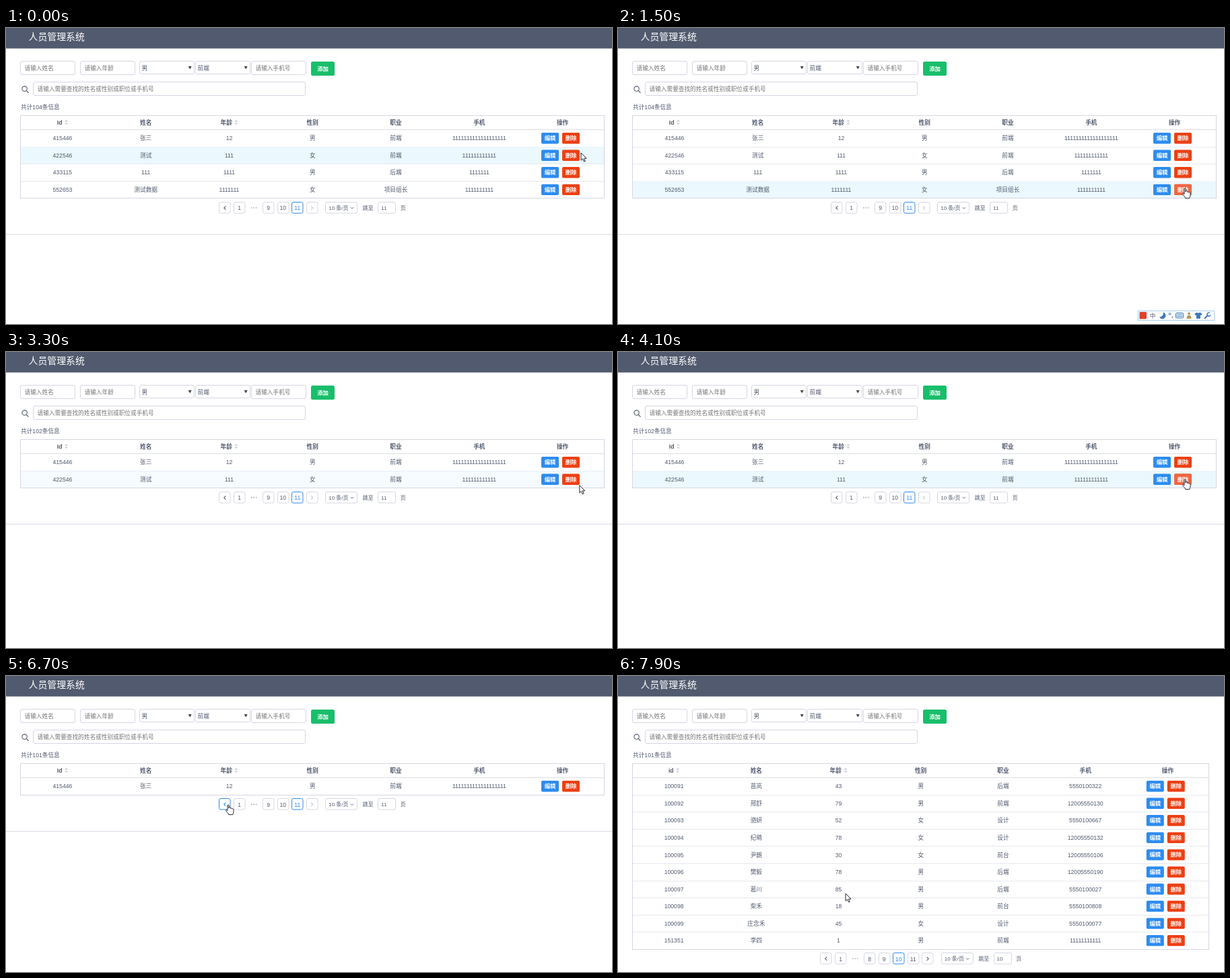
Recreate the animation shown at these times as an HTML page. Size 900 by 441 pixels, loop 8 s.

```html
<!DOCTYPE html>
<html lang="zh-CN">
<head>
<meta charset="utf-8">
<title>人员管理系统</title>
<style>
html, body { margin: 0; width: 100%; height: 100%; overflow: hidden; background: #fff; }
svg { display: block; width: 900px; height: 441px; }
text { font: 8.67px "Liberation Sans", "Noto Sans CJK SC", "Noto Sans CJK", sans-serif; fill: #515a6e; }
.hint { fill: #757575; }
.bold { font-weight: bold; }
.small { font-size: 8px; }
.white { fill: #fff; }
.title { font-size: 13.9px; fill: #fff; }
.btn { font-size: 8.4px; font-weight: bold; fill: #fff; }
.off { fill: #c5c8ce; }
.on { fill: #2d8cf0; }
</style>
</head>
<body>
<svg viewBox="0 0 900 441">
  <g id="fixed"></g>
  <g id="view"></g>
  <g id="ime"></g>
  <path id="cursor" stroke="#26262e" fill="#fff" stroke-linejoin="round"/>
</svg>
<script>
const LOOP = 8000, STEP = 100;
const TOP = 151.7, PITCH = 25.55, LEFT = 22;
const BORDER = '#d6d6e4', BLUE = '#2d8cf0', RED = '#ed4014';
const DELETES = [1800, 2900, 5000], TURN = 6900;
const HEADS = ['Id', '姓名', '年龄', '性别', '职业', '手机', '操作'];

const lastPage = [
  ['415446', '张三', '12', '男', '前端', '1'.repeat(19)],
  ['422546', '测试', '111', '女', '前端', '1'.repeat(12)],
  ['433115', '111', '1111', '男', '后端', '1'.repeat(7)],
  ['552653', '测试数据', '1111111', '女', '项目组长', '1'.repeat(10)]
];
const prevPage = [
  ['100091', '苗岚', '43', '男', '后端', '5550100322'],
  ['100092', '邢舒', '79', '男', '前端', '12005550130'],
  ['100093', '骆妍', '52', '女', '设计', '5550100667'],
  ['100094', '纪萌', '78', '女', '设计', '12005550132'],
  ['100095', '尹朗', '30', '女', '前台', '12005550106'],
  ['100096', '樊毅', '78', '男', '后端', '12005550190'],
  ['100097', '葛川', '85', '男', '后端', '5550100027'],
  ['100098', '柴禾', '18', '男', '前台', '5550100808'],
  ['100099', '庄念禾', '45', '女', '设计', '5550100077'],
  ['151351', '李四', '1', '男', '前端', '1'.repeat(11)]
];

// Pointer stops: time, x, y
const path = [
  [0, 854, 186], [500, 877, 230], [600, 879, 234], [900, 884, 237],
  [1000, 881, 237], [1300, 847, 239], [1500, 841, 239], [1900, 841, 239],
  [2500, 842, 214], [2950, 842, 214], [3500, 856, 192], [3800, 843, 190],
  [4100, 841, 190], [5000, 841, 190], [5800, 327, 198], [6400, 329, 192],
  [6900, 329, 192], [7700, 338, 324], [8000, 338, 324]
];
const ARROW = 'M0 0V11.2L2.6 8.8L4.5 13L6.3 12.2L4.5 8.2H8Z';
const HAND = 'M0 .8C0-.5 2-.5 2 .8V5C3-.0 4.6 4.4 4.6 5.4C5.4 4.6 6.8 5 6.8 6C7.6 5.4 9 5.8 9 7V10C9 12 8 12.6 7.8 14.6H1.6C1.4 12.4-1 11-2.4 8.6C-2.8 7.4-1.4 6.8-.8 7.8L0 8.6Z';

const $ = id => document.getElementById(id);
const text = (x, y, s, cls = '', anchor = 'middle') =>
  `<text x="${x}" y="${y}" dy=".37em" class="${cls}" text-anchor="${anchor}">${s}</text>`;
const rect = (x, y, w, h, fill, stroke = 'none', r = 2.5) =>
  `<rect x="${x}" y="${y}" width="${w}" height="${h}" rx="${r}" fill="${fill}" stroke="${stroke}"/>`;
const box = (x, y, w, h, stroke = BORDER) => rect(x, y, w, h, '#fff', stroke);
const shape = (d, fill, stroke = 'none', w = 1) =>
  `<path d="${d}" fill="${fill}" stroke="${stroke}" stroke-width="${w}"/>`;
const snap = v => Math.round(v) + .5;
const rule = (x1, x2, y, color) => shape(`M${x1} ${snap(y - .5)}H${x2}`, 'none', color);

function drawFixed() {
  let s = rect(0, 0, 900, 30.5, '#515a6e', 'none', 0) + text(33.5, 13, '人员管理系统', 'title', 'start');
  [[21.5, '请输入姓名'], [110.5, '请输入年龄'], [364.5, '请输入手机号']].forEach(([x, label]) => {
    s += box(x, 49.5, 81, 20) + text(x + 6, 59.7, label, 'hint', 'start');
  });
  [[198.5, '男'], [281.5, '前端']].forEach(([x, label]) => {
    s += box(x, 49.5, 81, 19) + text(x + 3, 59.7, label, '', 'start') +
      shape(`M${x + 72.2} 57h5l-2.5 4.4z`, '#444');
  });
  s += rect(453, 50, 35, 21, '#19be6b') + text(470.5, 61, '添加', 'btn');
  s += '<circle cx="27.6" cy="90.6" r="3.7" fill="none" stroke="#515a6e" stroke-width="1.1"/>' +
    shape('M30.3 93.4l3.2 3.2', 'none', '#515a6e', 1.3);
  return s + box(40.5, 80.5, 404, 20) +
    text(46.5, 90.5, '请输入需要查找的姓名或性别或职位或手机号', 'hint', 'start');
}

function drawIme() {
  const ink = '#3f78b8';
  let s = rect(772.5, 421.5, 113, 14, '#fff', '#a4cdf0', 0);
  s += rect(774.5, 423, 10.5, 10.5, '#e0402c', 'none', 1) + text(794, 428.5, '中', '', 'middle');
  s += shape('M809.5 423.5a5 5 0 1 1-5.5 7.2a5.5 5.5 0 0 0 5.5-7.2', ink);
  s += `<circle cx="819.5" cy="426" r="1.4" fill="none" stroke="${ink}"/>` + shape('M822.5 430h2l-1.5 3z', ink);
  s += rect(828.5, 424.5, 11, 7.5, '#dcebf8', ink, 1) +
    shape('M830 427h8M830 429.5h8', 'none', ink, .8);
  s += '<circle cx="848" cy="425.5" r="2" fill="#b79a50"/>' + shape('M844.5 433q0-5 3.5-5t3.5 5z', '#b79a50');
  s += shape('M858.5 424h2q1.3 1.5 2.6 0h2l2.4 2.5l-1.6 1.7l-1-.7v5.5h-6v-5.5l-1 .7l-1.6-1.7z', ink);
  return s + shape('M871 433l5-5', 'none', ink, 2) + shape('M879 424.5a2.6 2.6 0 1 0 1 3', 'none', ink, 1.5);
}

function pointer(t) {
  const i = Math.max(1, path.findIndex(p => p[0] >= t));
  const [t0, x0, y0] = path[i - 1], [t1, x1, y1] = path[i];
  const k = (t - t0) / (t1 - t0), e = k * k * (3 - 2 * k);
  return { x: x0 + (x1 - x0) * e, y: y0 + (y1 - y0) * e };
}

function stateAt(t) {
  const { x, y } = pointer(t), turned = t >= TURN;
  const total = 104 - DELETES.filter(d => t >= d).length;
  const rows = turned ? prevPage : lastPage.slice(0, total - 100);
  const bottom = TOP + rows.length * PITCH;
  const i = Math.floor((y - TOP) / PITCH);
  const row = !turned && i >= 0 && i < rows.length && x > LEFT && x < 889 ? i : -1;
  const mid = TOP + (row + .5) * PITCH;
  const del = row >= 0 && x >= 826 && x <= 852 && Math.abs(y - mid) < 8.5;
  const prev = !turned && x > 316 && x < 334 && Math.abs(y - bottom - 14.2) < 9;
  return { x, y, turned, total, rows, bottom, row, del, prev };
}

function drawTable(now, before) {
  const width = now.turned ? 855.5 : 866.5, right = LEFT + width, col = width / 7;
  const cx = i => LEFT + col * (i + .5);
  // Half strength on the first step of a hover, full on the next
  const fade = test => (test(now) + test(before)) / 2;
  let s = text(22, 118, `共计${now.total}条信息`, '', 'start');

  now.rows.forEach((cells, i) => {
    const y = TOP + i * PITCH, mid = y + PITCH / 2 - .3;
    const tint = fade(v => v.row === i);
    if (tint) s += `<g opacity="${tint}">${rect(LEFT, y, width, PITCH, '#ebf8fd', 'none', 0)}</g>`;
    cells.forEach((c, j) => { s += text(cx(j), mid, c); });
    const bx = cx(6) - 31.6, lit = fade(v => v.row === i && v.del);
    s += rect(bx, mid - 8.2, 26, 16.4, BLUE, 'none', 2) + text(bx + 13, mid, '编辑', 'btn');
    s += rect(bx + 31, mid - 8.2, 26, 16.4, RED, 'none', 2) +
      `<g opacity="${lit}">${rect(bx + 31, mid - 8.2, 26, 16.4, '#f16643', 'none', 2)}</g>` +
      text(bx + 44, mid, '删除', 'btn');
    if (i < now.rows.length - 1) s += rule(LEFT, right, y + PITCH, '#e6e8ee');
  });

  HEADS.forEach((h, i) => {
    const sorted = i === 0 || i === 2, x = cx(i) - (sorted ? 4.3 : 0);
    s += text(x, 140.8, i === 0 && now.turned ? 'id' : h, 'bold');
    if (sorted) {
      const a = x + (i ? 12.2 : 7.4);
      s += shape(`M${a} 139.6h5l-2.5-2.6zM${a} 141.4h5l-2.5 2.6z`, '#c5c8ce');
    }
  });
  s += rule(LEFT, right, TOP, '#dcdee2');
  return s + rect(21.5, 130.5, Math.round(width), snap(now.bottom - .5) - 130.5, 'none', BORDER, 0);
}

function drawPager(now, before) {
  const page = now.turned ? '10' : '11', y = now.bottom + 14.1, top = snap(y - 9);
  const items = now.turned ? ['<', '1', '…', '8', '9', '10', '11', '>'] : ['<', '1', '…', '9', '10', '11', '>'];
  const start = now.turned ? 300.3 : 316.4, gap = 21.55;
  let s = '';
  items.forEach((label, i) => {
    const x = start + i * gap, mid = x + 8.7;
    if (label === '…') {
      for (let k = -1; k < 2; k++) s += `<circle cx="${mid + k * 3.4}" cy="${y - .2}" r=".9" fill="#a5a9b4"/>`;
      return;
    }
    const hot = label === page || (label === '<' && now.prev && before.prev);
    s += box(snap(x), top, 16.5, 16.5, hot ? BLUE : BORDER);
    if (label === '<' || label === '>') {
      const d = label === '<' ? 1 : -1;
      const ink = hot ? BLUE : d < 0 && !now.turned ? '#c5c8ce' : '#515a6e';
      s += shape(`M${mid + d * 1.2} ${y - 2.6}l${-d * 2.5} 2.6l${d * 2.5} 2.6`, 'none', ink, 1.1);
    } else {
      s += text(mid, y, label, hot ? 'on' : '');
    }
  });
  const x = start + items.length * gap + 6.8;
  s += box(snap(x), top, 47, 16.5) + text(x + 5.2, y, '10 条/页', 'small', 'start') +
    shape(`M${x + 37.6} ${y - 1}l2.2 2.2l2.2-2.2`, 'none', '#6d7484', 1);
  s += text(x + 55.8, y, '跳至', 'small', 'start') + box(snap(x + 78), top, 26, 16.5);
  s += text(x + 83, y, page, 'small', 'start') + text(x + 111.8, y, '页', 'small', 'start');
  return s + rule(0, 900, now.bottom + 54, '#dcdae6');
}

function render(t) {
  const now = stateAt(t), before = stateAt(Math.max(0, t - STEP));
  $('view').innerHTML = drawTable(now, before) + drawPager(now, before);
  $('ime').style.display = t >= 500 && t < 1600 ? '' : 'none';
  $('cursor').setAttribute('d', now.del || now.prev ? HAND : ARROW);
  $('cursor').setAttribute('transform', `translate(${now.x} ${now.y})`);
}

$('fixed').innerHTML = drawFixed();
$('ime').innerHTML = drawIme();
let shown = -1;
function tick() {
  const t = Math.floor(performance.now() % LOOP / STEP) * STEP;
  if (t !== shown) render(shown = t);
  requestAnimationFrame(tick);
}
tick();
</script>
</body>
</html>
```
